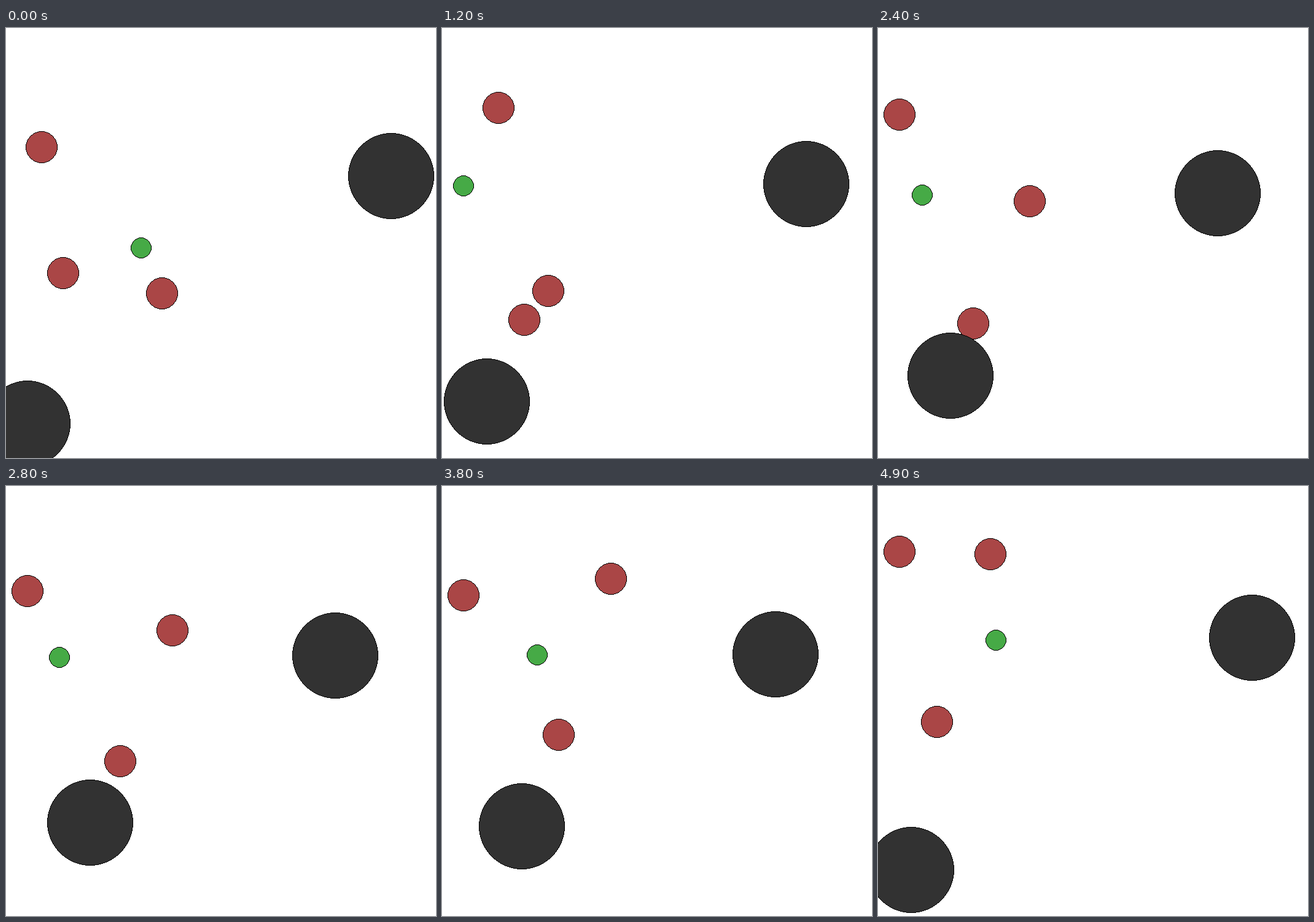
An HTML page with a canvas for the animation above (5000 ms loop, 700 px wide and 700 px high).

```html
<!DOCTYPE html>
<html lang="en">
<head>
<meta charset="utf-8">
<title>Chase</title>
<style>
html, body { margin: 0; width: 100%; height: 100%; overflow: hidden; background: #fff; }
canvas { display: block; }
</style>
</head>
<body>
<canvas id="stage" width="700" height="700"></canvas>
<script>
const ctx = document.getElementById('stage').getContext('2d');
const SIZE = 700, LOOP = 5000, STEP = 100, REACH = 0.45 * SIZE;

const chaser = (...path) => ({ r: 26, color: '#aa4646', path });
const runner = (...path) => ({ r: 17, color: '#46aa46', path });
const rock = (...spot) => ({ r: 70, color: '#323232', path: [spot] });

// All movers turn at the same moments; places are world units from the centre
const turns = [0, 1200, 2000, 2800, 3300, 4300, 4900];
const bodies = [
  chaser([-292, -156], [-293, -250], [-368.5, -297], [-467, -265], [-467, -253], [-419, -243], [-336, -259]),
  chaser([-257, 49], [-245, 143], [-276, 199], [-243, 146], [-219, 109], [-248, 55], [-270, 37]),
  chaser([-96, 82], [-201, 89], [-159, -11], [-117, -170], [-66, -228], [-160, -316], [-178, -254]),
  runner([-130, 8], [-358.5, -105], [-363, -106], [-389, -105], [-345, -140], [-214, -75], [-168, -105]),
  rock(-315, 294),
  rock(277, -109)
];

const slope = (path, i, k) => (path[i + 1][k] - path[i][k]) / (turns[i + 1] - turns[i]);

// Start at rest, and never overshoot a turning point
function speed(path, i, k) {
  if (i === 0) return 0;
  const a = slope(path, i - 1, k);
  if (i === path.length - 1) return a;
  const b = slope(path, i, k);
  return a * b > 0 ? 2 * a * b / (a + b) : 0;
}

function place({ path }, t) {
  if (path.length === 1) return path[0];
  const i = Math.min(turns.findLastIndex(turn => turn <= t), turns.length - 2);
  const h = turns[i + 1] - turns[i];
  const u = (t - turns[i]) / h, v = 1 - u;
  return [0, 1].map(k =>
    v * v * (1 + 2 * u) * path[i][k] + u * u * (1 + 2 * v) * path[i + 1][k]
    + h * u * v * (v * speed(path, i, k) - u * speed(path, i + 1, k)));
}

// Midpoint circle: hard pixel edges and a one-pixel black rim
function disc(cx, cy, r, color) {
  const rim = [];
  for (let x = 0, y = r, f = 1 - r; x < y;) {
    if (f >= 0) f -= 2 * --y;
    f += 2 * ++x + 1;
    rim.push([x, y], [y, x]);
  }
  ctx.fillStyle = color;
  for (const [x, y] of rim) ctx.fillRect(cx - x, cy - y, 2 * x, 2 * y);
  ctx.fillStyle = '#000';
  for (const [x, y] of rim)
    for (const px of [cx - x, cx + x - 1])
      for (const py of [cy - y, cy + y - 1]) ctx.fillRect(px, py, 1, 1);
}

function draw(t) {
  const spots = bodies.map(body => place(body, t));
  // The camera zooms so that the outermost body stays in view
  const zoom = REACH / Math.max(...spots.flat().map(Math.abs));
  const toPixel = c => Math.floor(SIZE / 2 + c * zoom + 1e-6);
  ctx.fillStyle = '#fff';
  ctx.fillRect(0, 0, SIZE, SIZE);
  bodies.forEach(({ r, color }, i) => disc(...spots[i].map(toPixel), r, color));
}

const start = performance.now();
function tick() {
  const t = (performance.now() - start) % LOOP;
  draw(Math.floor(t / STEP) * STEP);
  requestAnimationFrame(tick);
}
tick();
</script>
</body>
</html>
```
